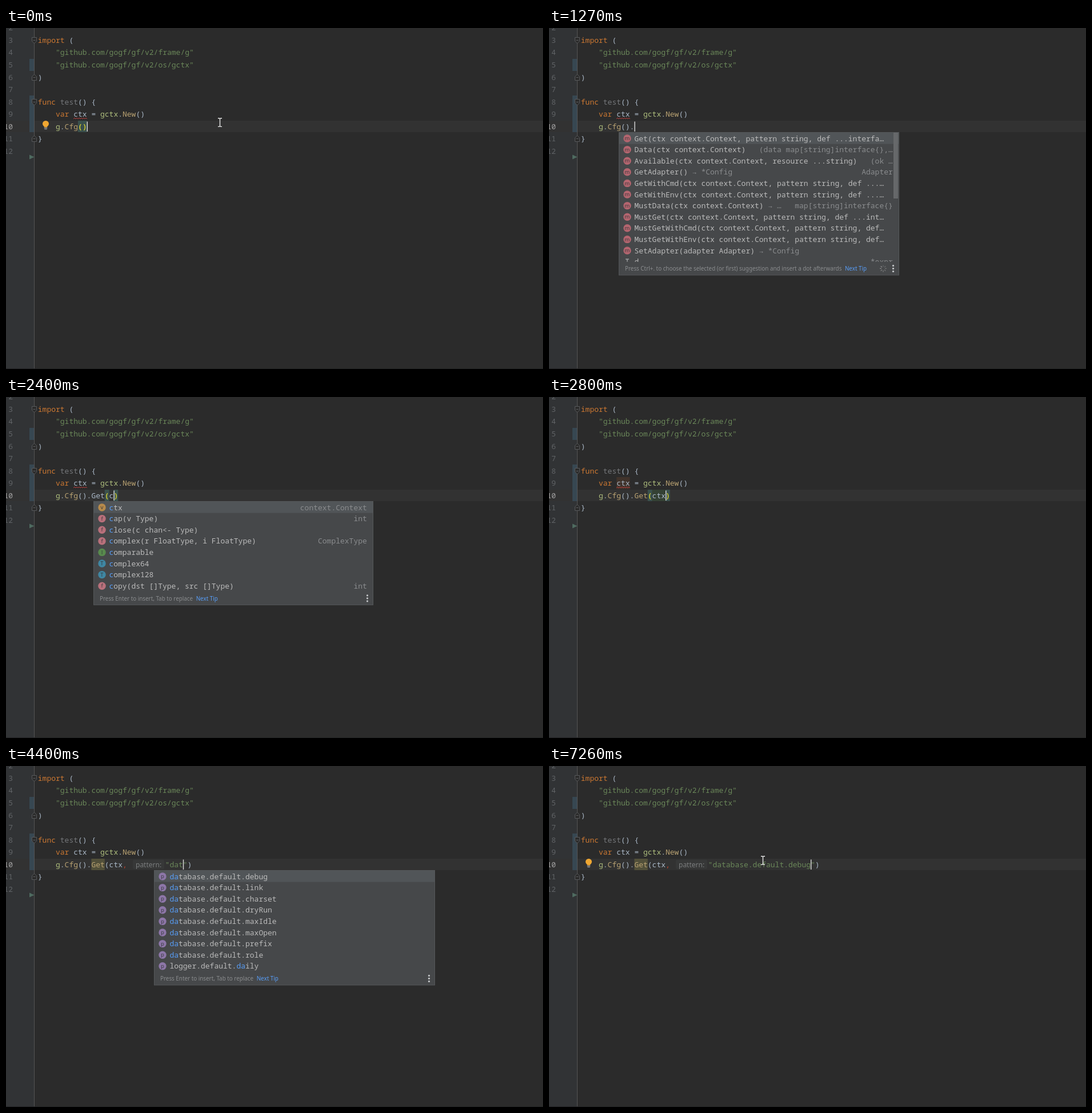
Animation of 940x596 px, one loop 7.59 s. Source, as an HTML page:

```html
<!DOCTYPE html>
<html lang="en">
<head>
<meta charset="utf-8">
<title>Code completion</title>
<style>
html, body { margin: 0; width: 100%; height: 100%; overflow: hidden; background: #2b2b2b; }
svg { display: block; width: 940px; height: 596px; }
text { white-space: pre; font: 13px "Noto Sans Mono", monospace; font-variant-ligatures: none; fill: #a9b7c6; }
text.ui { font: 9.85px "Noto Sans", sans-serif; fill: #8b8d8f; }
text.hint { font: 12px "Noto Sans", sans-serif; fill: #7b7d7e; }
text.badge { font: 9.5px "Open Sans", sans-serif; fill: #35373a; text-anchor: middle; }
</style>
</head>
<body>
<svg viewBox="0 0 940 596">
  <g id="base"></g>
  <g id="live"></g>
</svg>
<script>
const LOOP = 7590, CW = 7.8, LEFT = 55.8, ROW = 19.6;
const C = { key: '#cc7832', str: '#6a8759', txt: '#a9b7c6', pkg: '#afbf7e', fn: '#b9a272',
            dim: '#75777a', num: '#606366', pop: '#bbbbbb', grey: '#8a8c8e', hit: '#589df6' };

const esc = s => s.replace(/&/g, '&amp;').replace(/</g, '&lt;');
const rect = (x, y, w, h, fill, more = '') =>
  `<rect x="${x}" y="${y}" width="${w}" height="${h}" fill="${fill}" ${more}/>`;
const text = (x, y, s, fill, more = '') =>
  `<text x="${x}" y="${y}" ${fill ? `style="fill:${fill}"` : ''} ${more}>${esc(s)}</text>`;
const stroke = (d, color, w = 1) =>
  `<path d="${d}" fill="none" stroke="${color}" stroke-width="${w}"/>`;
const lineY = n => Math.round(25.8 + (n - 3) * 21.57);
const colX = c => LEFT + c * CW;

// Runs are [text, color] pairs laid out on the character grid.
function code(n, col, ...runs) {
  return runs.map(([s, color = C.txt]) => {
    const out = text(colX(col), lineY(n), s, color);
    col += s.length;
    return out;
  }).join('');
}

function fold(y, up) {
  const d = up ? `M45.5 ${y + 5}h8v-6.5l-4 -4l-4 4z` : `M45.5 ${y - 5}h8v6.5l-4 4l-4 -4z`;
  return `<path d="${d}" fill="#2b2b2b" stroke="#57595b"/>` + stroke(`M47.5 ${y}h4`, '#5f6163');
}

function drawBase() {
  let s = rect(0, 0, 940, 596, '#2b2b2b') + rect(0, 0, 49, 596, '#313335') +
    rect(0, 162, 940, 20, '#323232') +
    rect(41, 54, 8, 21, '#374752') + rect(41, 118, 8, 64, '#374752') +
    rect(49, 0, 1, 596, '#555555') + rect(0, 595, 940, 1, '#222324');
  for (let n = 2; n <= 12; n++)
    s += text(12 - CW * String(n).length, lineY(n), String(n), n === 10 ? '#a4a3a3' : C.num);
  s += fold(21.5) + fold(86.5, true) + fold(129.5) + fold(193.5, true) +
    '<path d="M41 221.5l8.5 4l-8.5 4z" fill="#4f6b60"/>';
  s += code(3, 0, ['import', C.key], [' (']) +
    code(4, 4, ['"github.com/gogf/gf/v2/frame/g"', C.str]) +
    code(5, 4, ['"github.com/gogf/gf/v2/os/gctx"', C.str]) +
    code(6, 0, [')']) +
    code(8, 0, ['func ', C.key], ['test', C.dim], ['() {']) +
    code(11, 0, ['}']);
  return s;
}

const method = (name, tail = '', right = '') => ['m', name, tail, right];
const sig = 'ctx context.Context';
const getters = [
  method(`Get(${sig}, pattern string, def ...interfa…`),
  method('GetAdapter()', ' → *Config', 'Adapter'),
  method(`GetWithCmd(${sig}, pattern string, def ...…`),
  method(`GetWithEnv(${sig}, pattern string, def ...…`),
  method(`MustGet(${sig}, pattern string, def ...int…`),
  method(`MustGetWithCmd(${sig}, pattern string, def…`),
  method(`MustGetWithEnv(${sig}, pattern string, def…`)
];
const all = [
  getters[0],
  method(`Data(${sig})`, '', '(data map[string]interface{},…'),
  method(`Available(${sig}, resource ...string)`, '', '(ok …'),
  ...getters.slice(1, 4),
  method(`MustData(${sig})`, ' → …', 'map[string]interface{}'),
  ...getters.slice(4),
  method('SetAdapter(adapter Adapter)', ' → *Config'),
  ['', 'd', '', '*expr']
];
const builtins = [
  ['v', 'ctx', '', 'context.Context'],
  ['f', 'cap(v Type)', '', 'int'],
  ['f', 'close(c chan<- Type)', '', ''],
  ['f', 'complex(r FloatType, i FloatType)', '', 'ComplexType'],
  ['I', 'comparable', '', ''],
  ['T', 'complex64', '', ''],
  ['T', 'complex128', '', ''],
  ['f', 'copy(dst []Type, src []Type)', '', 'int']
];
const keys = ['debug', 'link', 'charset', 'dryRun', 'maxIdle', 'maxOpen', 'prefix', 'role']
  .map(k => ['p', 'database.default.' + k, '', '']);
keys.push(['p', 'logger.default.daily', '', '']);

// A popup opens at a column of the statement, where the completed word starts.
const dotTip = 'Press Ctrl+. to choose the selected (or first) suggestion and insert a dot afterwards';
const enterTip = 'Press Enter to insert, Tab to replace';
const popup = (col, width, tip) => (rows, match, busy) => ({ col, width, tip, rows, match, busy });
const callPop = popup(8, 491, dotTip);
const argPop = popup(12, 490, enterTip);
const keyPop = popup(18, 492, enterTip);

const badgeColor = { m: '#b4656f', f: '#b9707b', v: '#b68a4b', I: '#588a4d', T: '#3f87a3', p: '#8d76a8' };

function drawRow([kind, name, tail, right], x, y, end, match) {
  const base = y + 14.6;
  let s = '';
  if (kind)
    s = `<circle cx="${x + 15}" cy="${y + 10}" r="6.7" fill="${badgeColor[kind]}"/>` +
      text(x + 15, y + 13.2, kind, '', 'class="badge"');
  else
    s = stroke(`M${x + 12} ${y + 5.5}h6M${x + 15} ${y + 5}v10`, '#9a9c9e', 1.5);
  const at = match ? name.toLowerCase().indexOf(match) : -1;
  const put = (i, str, color) => str ? text(x + 27.4 + i * CW, base, str, color) : '';
  if (at < 0) s += put(0, name, C.pop);
  else {
    const stop = at + match.length;
    s += put(0, name.slice(0, at), C.pop) + put(at, name.slice(at, stop), C.hit) +
      put(stop, name.slice(stop), C.pop);
  }
  return s + put(name.length, tail, C.grey) +
    (right ? text(end, base, right, C.grey, 'text-anchor="end"') : '');
}

function drawPopup(p, x) {
  const y = 183, end = x + p.width, list = Math.min(p.rows.length, 11.5) * ROW;
  const foot = y + list + 12;
  let s = rect(x + .5, y - .5, p.width - 1, list + 24, '#46484a', 'stroke="#55585a"') +
    rect(x + 1, y, p.width - 2, ROW, '#515558');
  s += `<clipPath id="list"><rect x="${x}" y="${y}" width="${p.width}" height="${list}"/></clipPath>` +
    '<g clip-path="url(#list)">' +
    p.rows.map((r, i) => drawRow(r, x, y + i * ROW, end - 11.2, p.match)).join('') + '</g>';
  if (p.rows.length > 11) s += rect(end - 10, y, 8, 115, '#66686a');
  s += `<text class="ui" x="${x + 11}" y="${foot + 3.8}">${p.tip}` +
    `<tspan dx="5.5" fill="${C.hit}">Next Tip</tspan></text>`;
  for (const d of [-5, 0, 5])
    s += `<circle cx="${end - 10.5}" cy="${foot + d}" r="1.6" fill="#c4c6c8"/>`;
  if (p.busy)
    for (let i = 0; i < 8; i++)
      s += `<path d="M0 -3v-3" stroke="#999" stroke-width="1.3" opacity="${.35 + i * .07}" ` +
        `transform="translate(${end - 28} ${foot}) rotate(${i * 45})"/>`;
  return s;
}

const bulb = '<path d="M67 173.5c0 -2 -3 -2.8 -3 -6.2a5.5 5.3 0 0 1 11 0c0 3.4 -3 4.2 -3 6.2z" fill="#f0a732"/>' +
  rect(66.7, 174, 5.6, 1.2, '#9a9c9e') + rect(67.2, 176, 4.6, 1.2, '#9a9c9e');
const mouse = stroke('M371 157.7h2.3l1.2 1l1.2 -1h2.3M374.5 158.5v13M371 172.4h2.3l1.2 -1l1.2 1h2.3', '#e8e8e8', 1.4);

// Each step changes part of the state; "|" marks the caret.
const steps = [
  [0, { tail: '()|', bulb: 1, mouse: 1, caret: 1, pair: 1, error: 1 }],
  [140, { bulb: 0 }],
  [260, { caret: 0 }],
  [650, { bulb: 1 }],
  [720, { caret: 1 }],
  [1050, { tail: '().|', bulb: 0, mouse: 0, pair: 0 }],
  [1270, { pop: callPop(all, '', true) }],
  [1470, { tail: '().g|' }],
  [1540, { pop: callPop(getters, 'g') }],
  [1600, { tail: '().ge|', pop: callPop(getters, 'ge') }],
  [1670, { tail: '().get|' }],
  [1740, { pop: callPop(getters, 'get') }],
  [2000, { tail: '().Get(|)', pair: 1, pop: null }],
  [2200, { tail: '().Get(c|)' }],
  [2400, { pop: argPop(builtins, 'c') }],
  [2470, { tail: '().Get(ct|)' }],
  [2540, { pop: argPop(builtins.slice(0, 1), 'ct') }],
  [2670, { tail: '().Get(ctx|)', pop: null }],
  [2800, { usage: 1, known: 1 }],
  [3070, { tail: '().Get(ctx,|)', usage: 0 }],
  [3270, { tail: '().Get(ctx, |)' }],
  [3540, { tail: '().Get(ctx, "|")' }],
  [3600, { pair: 0 }],
  [3860, { hint: 1, error: 0 }],
  [4000, { tail: '().Get(ctx, "d|")' }],
  [4200, { tail: '().Get(ctx, "da|")' }],
  [4260, { pop: keyPop(keys, 'da') }],
  [4330, { tail: '().Get(ctx, "dat|")' }],
  [4460, { pop: keyPop(keys.slice(0, 8), 'dat') }],
  [5140, { tail: '().Get(ctx, "database.default.debug|")', pop: null }],
  [6020, { mouse: 1 }],
  [6800, { caret: 0 }],
  [7130, { bulb: 1 }],
  [7260, { caret: 1 }]
];
let last = {};
const states = steps.map(([, change]) => last = { ...last, ...change });

function draw(s) {
  const full = 'g.Cfg' + s.tail;
  const src = full.replace('|', ''), caretCol = full.indexOf('|');
  const x = c => colX(4 + c) + (s.hint && c >= 17 ? 59 : 0);
  const y = lineY(10);
  let out = '';

  if (s.usage) out += rect(colX(8), 140, 23.4, 21, '#40332b') + rect(x(12), 162, 23.4, 20, '#344134');
  if (s.hint)
    out += rect(x(8), 162, 23.4, 20, '#52503a') + rect(222, 164, 55, 16, '#373838', 'rx="2"') +
      text(227, 176.5, 'pattern:', '', 'class="hint"');

  out += code(9, 4, ['var', C.key], [' ctx = '], ['gctx', C.pkg], ['.'], ['New', C.fn], ['()']);
  if (s.error) out += stroke('M118 159' + 'l2 -2l2 2'.repeat(6), '#bc3f3c');

  const pair = s.pair ? [src.lastIndexOf('('), src.length - 1] : [];
  for (const c of pair) out += rect(x(c), 162, CW, 20, '#3b514d');

  const colors = { g: C.pkg, Cfg: C.fn, Get: s.known ? C.fn : C.txt, ',': s.hint ? '#b8432f' : C.key };
  for (const m of src.matchAll(/"[^"]*"|\w+|[^\w\s]/g)) {
    const run = m[0], lit = pair.includes(m.index);
    const color = lit ? '#ffef28' : run[0] === '"' ? C.str : colors[run] || C.txt;
    out += text(x(m.index), y, run, color, lit ? 'font-weight="700"' : '');
  }

  if (s.bulb) out += bulb;
  if (s.caret) out += rect(x(caretCol), 163.5, 1.4, 17.5, '#dddddd');
  if (s.pop) out += drawPopup(s.pop, Math.round(x(s.pop.col) - 27.4));
  if (s.mouse) out += mouse;
  return out;
}

const live = document.getElementById('live');
document.getElementById('base').innerHTML = drawBase();
let shown = -1;
function tick() {
  const t = performance.now() % LOOP;
  const i = steps.findLastIndex(([at]) => at <= t);
  if (i !== shown) live.innerHTML = draw(states[shown = i]);
  requestAnimationFrame(tick);
}
tick();
</script>
</body>
</html>
```
